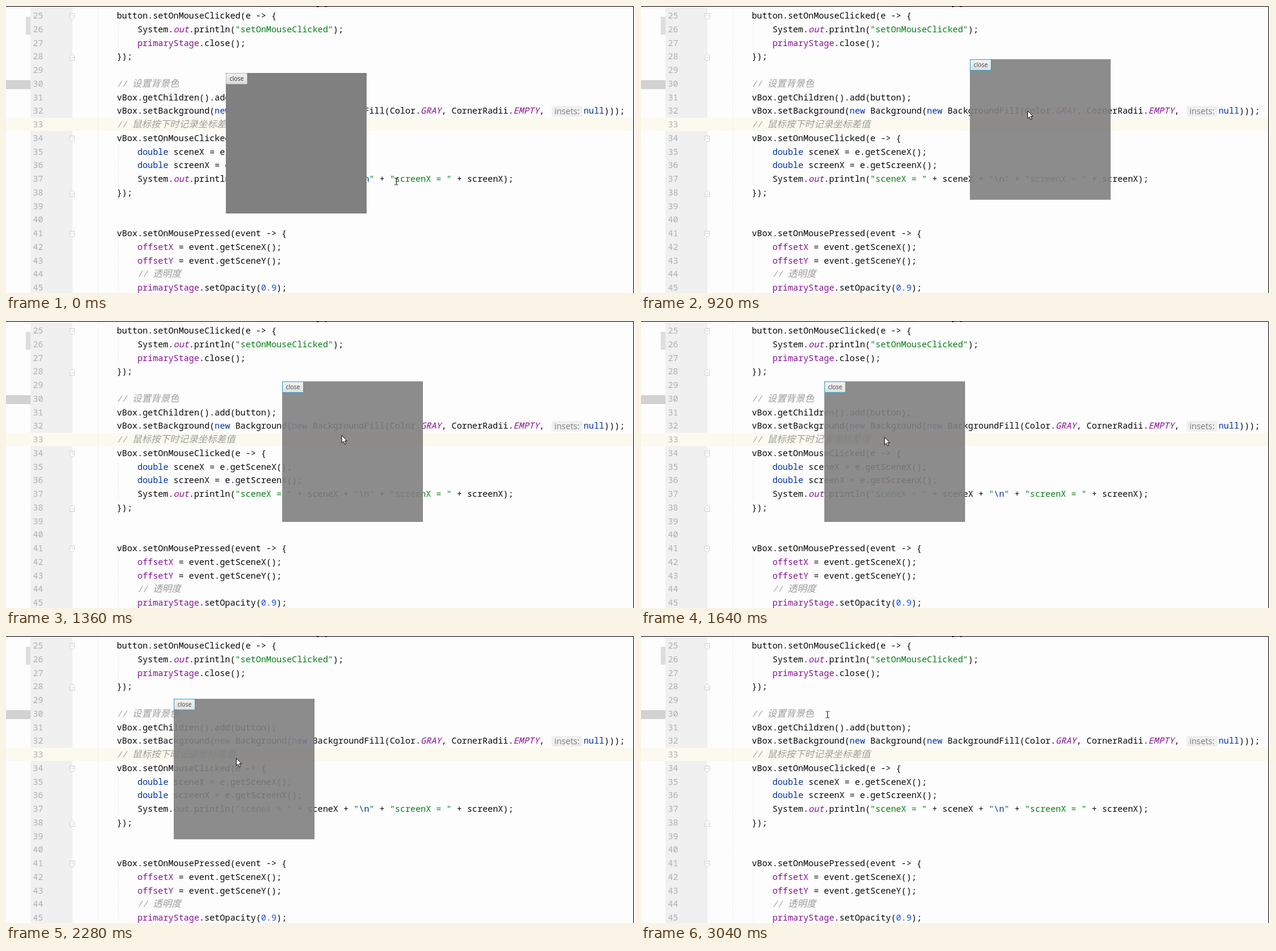
An HTML page that plays this animation: 1050 px wide and 480 px high, repeating every 3.08 s.

```html
<!DOCTYPE html>
<html lang="en">
<head>
<meta charset="utf-8">
<title>Dragging a window over code</title>
<style>
  html, body { margin: 0; width: 100%; height: 100%; overflow: hidden; background: #fdfdfd; }
  #stage { position: absolute; left: 0; top: 0; width: 1050px; height: 480px; overflow: hidden; background: #fdfdfd; }
  #stage > * { position: absolute; }
  pre {
    margin: 0; top: 5px; color: #080808;
    font: 14.333px/22.75px "Noto Sans Mono", "DejaVu Sans Mono", monospace;
    font-variant-ligatures: none;
  }
  #code { left: 185px; }
  #nums { left: 45px; color: #b0b0b0; }
  #code b { font-weight: 400; color: #0033a0; }
  #code u { text-decoration: none; color: #871094; }
  #code em { color: #871094; }
  #code q { quotes: none; color: #067d17; }
  #code s { text-decoration: none; color: #9c9c9c; font-style: italic; }
  #code s span { font: italic 15.65px/0 "Noto Sans CJK SC", "Noto Sans CJK", sans-serif; }
  #code .n { color: #1750eb; }
  #code .gap { padding-left: 57px; }
  .hint {
    left: 911px; top: 167px; width: 51px; height: 18px; border-radius: 3px;
    background: #efefef; color: #7e7e7e; text-align: center;
    font: 14px/18px "Open Sans", "Noto Sans", sans-serif;
  }
  svg { left: 0; top: 0; }
  #win { left: 0; top: 0; width: 235px; height: 235px; background: #808080; }
  #btn {
    box-sizing: border-box; width: 36px; height: 19px; border: 1px solid #bababa; border-radius: 2px;
    background: linear-gradient(#f0f0f0, #dddddd); color: #333; text-align: center;
    font: 10px/17px "Open Sans", "Noto Sans", sans-serif;
  }
  #win.active { opacity: .9; }
  #win.active #btn { border-color: #1e9cc8; }
</style>
</head>
<body>
<div id="stage">
  <svg width="1050" height="480">
    <defs>
      <path id="fold" d="M-4 -5H4V2L0 5.5L-4 2ZM-2 -1H2" fill="#fbfbfb" stroke="#d0d0d0"/>
    </defs>
    <rect x="41" width="70" height="480" fill="#f0f0f0"/>
    <rect y="187" width="1047" height="22" fill="#fcfaef"/>
    <rect y="124" width="41" height="15" fill="#d2d2d2"/>
    <rect x="33" y="18" width="8" height="30" fill="#dedede"/>
    <path d="M153.5 0V480M187.5 28V74M187.5 233V301M187.5 392V480" stroke="#e8e8e8" stroke-dasharray="2 2"/>
    <use href="#fold" x="110.5" y="17.5"/>
    <use href="#fold" x="110.5" y="222.5"/>
    <use href="#fold" x="110.5" y="381.5"/>
    <use href="#fold" transform="translate(110.5 85.5) scale(1 -1)"/>
    <use href="#fold" transform="translate(110.5 313.5) scale(1 -1)"/>
    <rect x="421" y="1" width="37" height="2" fill="#ececec"/>
    <path d="M519 1.5H522M533 1.5H535" stroke="#444"/>
    <path d="M0 .5H1047.5V480" fill="none" stroke="#000"/>
    <rect x="1048" width="2" height="480" fill="#fff"/>
  </svg>
  <pre id="nums"></pre>
  <pre id="code">button.setOnMouseClicked(e -&gt; {
    System.<em>out</em>.println(<q>"setOnMouseClicked"</q>);
    <u>primaryStage</u>.close();
});

<s>// <span>设置背景色</span></s>
vBox.getChildren().add(button);
vBox.setBackground(<b>new</b> Background(<b>new</b> BackgroundFill(Color.<em>GRAY</em>, CornerRadii.<em>EMPTY</em>, <span class="gap"></span><b>null</b>)));
<s>// <span>鼠标按下时记录坐标差值</span></s>
vBox.setOnMouseClicked(e -&gt; {
    <b>double</b> sceneX = e.getSceneX();
    <b>double</b> screenX = e.getScreenX();
    System.<em>out</em>.println(<q>"sceneX = "</q> + sceneX + <q>"<b>\n</b>"</q> + <q>"screenX = "</q> + screenX);
});


vBox.setOnMousePressed(event -&gt; {
    <u>offsetX</u> = event.getSceneX();
    <u>offsetY</u> = event.getSceneY();
    <s>// <span>透明度</span></s>
    <u>primaryStage</u>.setOpacity(<span class="n">0.9</span>);</pre>
  <div class="hint">insets:</div>
  <div id="win"><div id="btn">close</div></div>
  <svg width="1050" height="480">
    <path id="arrow" d="M.5 .5V13L3.4 10.3L5.5 15L7.6 14L5.5 9.5H9.3Z" fill="#fff" stroke="#111"/>
    <path id="beam" d="M-3 -5.5H-1L0 -4.5L1 -5.5H3M0 -4.5V4.5M-3 5.5H-1L0 4.5L1 5.5H3" fill="none" stroke="#111"/>
  </svg>
</div>
<script>
const LOOP = 3080, TICK = 40, SIZE = 235;
const PRESS = 520, DRAG = 600, DROP = 2280, AIM = 2640, CLOSE = 2720, REST = 2960;

// Turning points of the drag: time, left, top
const turns = [[DRAG, 367, 112], [920, 549, 89], [1360, 461, 101], [1640, 306, 101], [DROP, 280, 105]];

const get = id => document.getElementById(id);
const win = get("win"), arrow = get("arrow"), beam = get("beam");
get("nums").textContent = Array.from({ length: 21 }, (_, i) => 25 + i).join("\n");

const part = (t, a, b) => Math.min(1, Math.max(0, (t - a) / (b - a)));
const ease = k => k * k * (3 - 2 * k);
const mix = (a, b, k) => a.map((v, i) => v + (b[i] - v) * k);
const add = (a, b) => a.map((v, i) => v + b[i]);

// Speed through a turn; the drag starts and ends at rest
function slope(i, c) {
  const a = turns[i - 1], b = turns[i + 1];
  return a && b ? (b[c] - a[c]) / (b[0] - a[0]) : 0;
}

function windowAt(t) {
  const i = Math.max(0, turns.findLastIndex((p, n) => p[0] <= t && n < turns.length - 1));
  const a = turns[i], b = turns[i + 1], span = b[0] - a[0], k = part(t, a[0], b[0]);
  return [1, 2].map(c => Math.round(
    a[c] + (b[c] - a[c]) * ease(k)
    + span * k * (1 - k) * (slope(i, c) * (1 - k) - slope(i + 1, c) * k)
  ));
}

function mouseAt(t, corner) {
  // The window lags a little, so the grip drifts
  const grip = add(corner, mix([94, 83], [104, 99], part(t, DRAG, DROP)));
  const button = add(corner, [19, 12]);
  if (t < PRESS) return mix([651, 293], grip, ease(part(t, 0, PRESS)));
  if (t < CLOSE) return mix(grip, button, ease(part(t, DROP, AIM)));
  return mix(button, [311, 131], ease(part(t, CLOSE, REST)));
}

const show = (el, on) => { el.style.visibility = on ? "visible" : "hidden"; };

function draw(t) {
  const corner = windowAt(t), mouse = mouseAt(t, corner).map(Math.round);
  const open = t < CLOSE;
  const over = open && mouse.every((v, i) => v >= corner[i] && v < corner[i] + SIZE);
  win.style.transform = `translate(${corner[0]}px, ${corner[1]}px)`;
  win.classList.toggle("active", t >= PRESS);
  show(win, open);
  show(arrow, over);
  show(beam, !over);
  arrow.setAttribute("transform", `translate(${mouse})`);
  beam.setAttribute("transform", `translate(${add(mouse, [.5, .5])})`);
}

const start = performance.now();
function loop() {
  const t = (performance.now() - start) % LOOP;
  draw(Math.floor(t / TICK) * TICK);
  requestAnimationFrame(loop);
}
loop();
</script>
</body>
</html>
```
